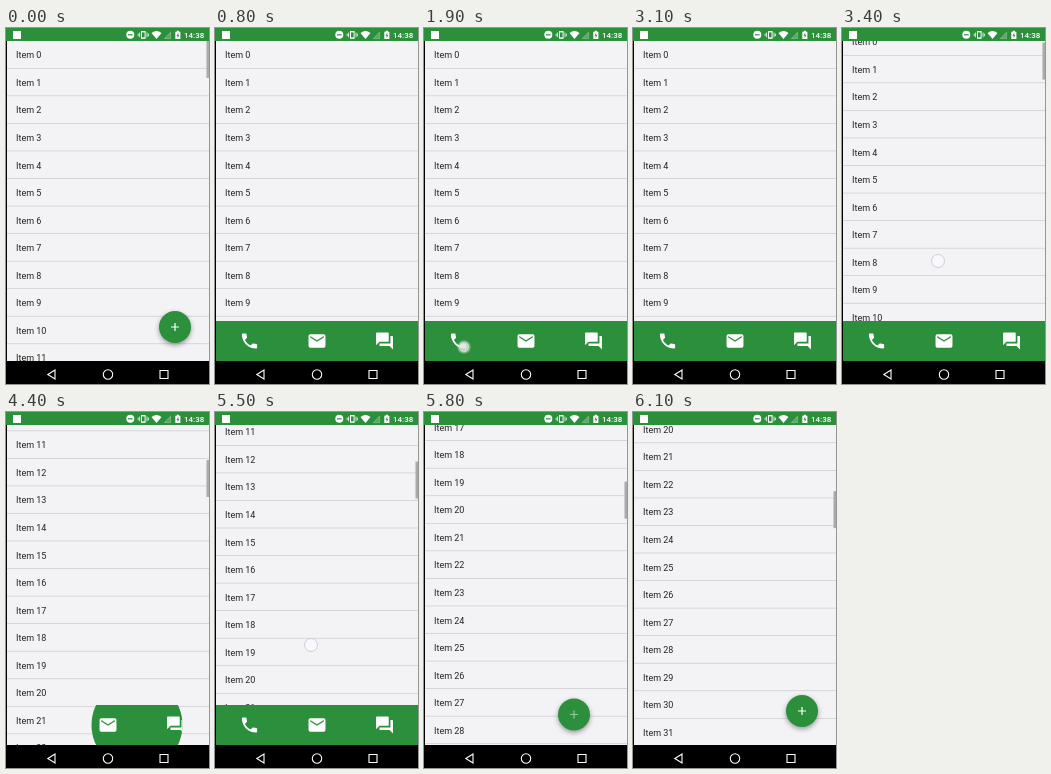
Recreate the animation shown at these times as an HTML page with a canvas. Size 203 by 356 pixels, loop 6.2 s.

```html
<!DOCTYPE html>
<html lang="en">
<head>
<meta charset="utf-8">
<title>Expanding toolbar</title>
<style>
  html, body { margin: 0; width: 100%; height: 100%; overflow: hidden; background: #000; }
  canvas { display: block; width: 203px; height: 356px; }
</style>
</head>
<body>
<canvas id="stage"></canvas>
<script>
const W = 203, H = 356, LOOP = 6200, STEP = 100;
const GREEN = '#2b8f3c', PAPER = '#f3f2f5';
const ROW = 27.55, TOP = 13, BAR_TOP = 293, NAV_TOP = 333;
const FAB = { x: 169, y: 299, r: 16 }, HUB = { x: 131, y: 313, r: 134 };

const canvas = document.getElementById('stage');
const ctx = canvas.getContext('2d');
const ratio = window.devicePixelRatio || 1;
canvas.width = W * ratio;
canvas.height = H * ratio;

const icons = [
  { x: 34.5, path: new Path2D('M6.62 10.79c1.44 2.83 3.76 5.14 6.59 6.59l2.2-2.2c.27-.27.67-.36 1.02-.24 1.12.37 2.33.57 3.57.57.55 0 1 .45 1 1V20c0 .55-.45 1-1 1-9.39 0-17-7.61-17-17 0-.55.45-1 1-1h3.5c.55 0 1 .45 1 1 0 1.25.2 2.45.57 3.57.11.35.03.74-.25 1.02z') },
  { x: 102, path: new Path2D('M20 4H4a2 2 0 0 0-2 2v12a2 2 0 0 0 2 2h16a2 2 0 0 0 2-2V6a2 2 0 0 0-2-2zm0 4l-8 5-8-5V6l8 5 8-5z') },
  { x: 169.5, path: new Path2D('M21 6h-2v9H6v2a1 1 0 0 0 1 1h11l4 4V7a1 1 0 0 0-1-1zm-4 6V3a1 1 0 0 0-1-1H3a1 1 0 0 0-1 1v14l4-4h10a1 1 0 0 0 1-1z') }
];

const clamp = v => Math.min(1, Math.max(0, v));
const progress = (t, from, to) => clamp((t - from) / (to - from));
const ease = p => (1 - Math.cos(Math.PI * p)) / 2;
const mix = (a, b, p) => a + (b - a) * p;

// Piecewise linear track of [time, value] pairs.
function track(t, points) {
  let i = 1;
  while (i < points.length - 1 && t > points[i][0]) i++;
  const [a, b] = [points[i - 1], points[i]];
  return mix(a[1], b[1], progress(t, a[0], b[0]));
}

const scrollAt = t => track(t, [
  [3200, 0], [3300, 4], [3400, 13], [3500, 70], [3600, 170], [3700, 245],
  [3800, 287], [3900, 295], [4000, 297], [5300, 297], [5400, 301], [5500, 310],
  [5600, 360], [5700, 425], [5800, 480], [5900, 520], [6000, 545], [6100, 560.5]
]);

// 0 = button at rest, 1 = button moved to the hub, 2 = toolbar fully open.
const openAt = t => track(t, [
  [300, 0], [500, 1], [800, 2], [3400, 2], [3600, 1], [3800, 0],
  [4100, 0], [4300, 1], [4600, 2], [5500, 2], [5700, 1], [5900, 0]
]);

const scrollbarAt = t => track(t, [
  [100, 1], [400, 0], [3200, 0], [3300, 1], [4600, 1], [4800, 0], [5300, 0], [5400, 1]
]);

const taps = [
  { from: 100, to: 300, x: 172, y: 304 },
  { from: 1900, to: 2200, x: 40, y: 319 },
  { from: 2300, to: 2500, x: 107, y: 319 },
  { from: 2600, to: 2900, x: 174, y: 319 },
  { from: 3200, to: 3600, x: 96, y: 246, drag: 0 },
  { from: 3900, to: 4100, x: 172, y: 304 },
  { from: 5300, to: 5700, x: 96, y: 246, drag: 297 }
];

function disc(x, y, r, fill) {
  ctx.beginPath();
  ctx.arc(x, y, r, 0, Math.PI * 2);
  ctx.fillStyle = fill;
  ctx.fill();
}

function rect(x, y, w, h, fill) {
  ctx.fillStyle = fill;
  ctx.fillRect(x, y, w, h);
}

function line(d, color, width = 1) {
  ctx.strokeStyle = color;
  ctx.lineWidth = width;
  ctx.stroke(new Path2D(d));
}

function shape(d, fill = '#fff') {
  ctx.fillStyle = fill;
  ctx.fill(new Path2D(d));
}

function text(str, x, y, font, fill) {
  ctx.font = font + ' Roboto, sans-serif';
  ctx.textBaseline = 'alphabetic';
  ctx.fillStyle = fill;
  ctx.fillText(str, x, y);
}

function drawList(scroll, barAlpha) {
  rect(1, TOP, W - 1, NAV_TOP - TOP, PAPER);
  const first = Math.floor(scroll / ROW);
  for (let i = first; i < first + 13; i++) {
    const y = TOP + i * ROW - scroll;
    text('Item ' + i, 10, y + 17.3, '9px', '#222');
    rect(1, y + ROW - 0.6, W - 1, 0.7, '#cbcacd');
  }
  ctx.globalAlpha = barAlpha;
  rect(200.5, TOP + scroll * 0.118, 2.5, 37, '#aaa9ab');
  ctx.globalAlpha = 1;
}

function drawStatus() {
  rect(0, 0, W, TOP, GREEN);
  rect(7, 3, 8, 8, '#fff');
  disc(124.3, 6.8, 4, '#fff');
  rect(122, 6.2, 4.6, 1.2, GREEN);
  rect(135, 3, 4.6, 7.8, '#fff');
  rect(136, 4.4, 2.6, 5, GREEN);
  line('M133.6 4.5V9.3M141 4.5V9.3M132.2 5.6V8.2M142.4 5.6V8.2', '#fff', 0.8);
  shape('M145.5 5Q150.5 1 155.5 5L150.5 11Z');
  shape('M157.5 11L165 3.2V11Z', '#5ba767');
  line('M158.5 10.6L164.6 4.2V10.6Z', '#8dc397', 0.5);
  shape('M169.3 3.8H170.7V2.8H173V3.8H174.4V11H169.3Z');
  shape('M172.3 4.8L170.5 7.7H171.7V10L173.3 7H172.2Z', GREEN);
  text('14:38', 178, 9.8, '500 8px', '#fff');
}

function drawNav() {
  rect(0, NAV_TOP, W, H - NAV_TOP, '#000');
  line('M49 342V351L41.8 346.5Z', '#fff', 1.1);
  line('M106.7 346.5A4.7 4.7 0 1 1 97.3 346.5A4.7 4.7 0 1 1 106.7 346.5', '#fff', 1.1);
  line('M154 342.5H162V350.5H154Z', '#fff', 1.1);
}

function drawButton(p) {
  const q = ease(p);
  const x = mix(FAB.x, HUB.x, q), y = mix(FAB.y, HUB.y, q * q);
  ctx.save();
  ctx.shadowColor = 'rgba(0,0,0,.38)';
  ctx.shadowBlur = 5 * ratio;
  ctx.shadowOffsetY = 2 * ratio;
  disc(x, y, FAB.r, GREEN);
  ctx.restore();
  ctx.globalAlpha = 1 - p;
  line(`M${x - 4} ${y}h8M${x} ${y - 4}v8`, '#fff', 1.2);
  ctx.globalAlpha = 1;
}

function drawToolbar(p) {
  ctx.save();
  ctx.beginPath();
  ctx.arc(HUB.x, HUB.y, mix(FAB.r, HUB.r, ease(p)), 0, Math.PI * 2);
  ctx.clip();
  rect(1, BAR_TOP, W - 1, NAV_TOP - BAR_TOP, GREEN);
  for (const { x, path } of icons) {
    ctx.save();
    ctx.translate(x, 313);
    ctx.scale(0.846, 0.846);
    ctx.translate(-12, -12);
    ctx.fillStyle = '#fff';
    ctx.fill(path);
    ctx.restore();
  }
  ctx.restore();
}

function drawTouch(t, scroll) {
  for (const { from, to, x, y, drag } of taps) {
    if (t < from || t >= to) continue;
    const dragged = drag !== undefined;
    const py = dragged ? y - (scroll - drag) : y;
    if (dragged) {
      disc(x, py, 6.5, 'rgba(250,249,255,.8)');
      ctx.strokeStyle = '#c3c0dc';
      ctx.lineWidth = 0.8;
      ctx.stroke();
    } else {
      disc(x, py, 6.8, 'rgba(215,228,218,.4)');
      disc(x, py, 5.2, 'rgba(222,230,224,.75)');
    }
  }
}

function draw(t) {
  const scroll = scrollAt(t), open = openAt(t);
  ctx.setTransform(ratio, 0, 0, ratio, 0, 0);
  drawList(scroll, scrollbarAt(t));
  if (open <= 1) drawButton(open);
  else drawToolbar(open - 1);
  drawTouch(t, scroll);
  drawStatus();
  drawNav();
  rect(0, TOP, 1, H - TOP, '#000');
}

const start = performance.now();
function frame() {
  const t = (performance.now() - start) % LOOP;
  draw(Math.floor(t / STEP) * STEP);
  requestAnimationFrame(frame);
}
frame();
</script>
</body>
</html>
```
